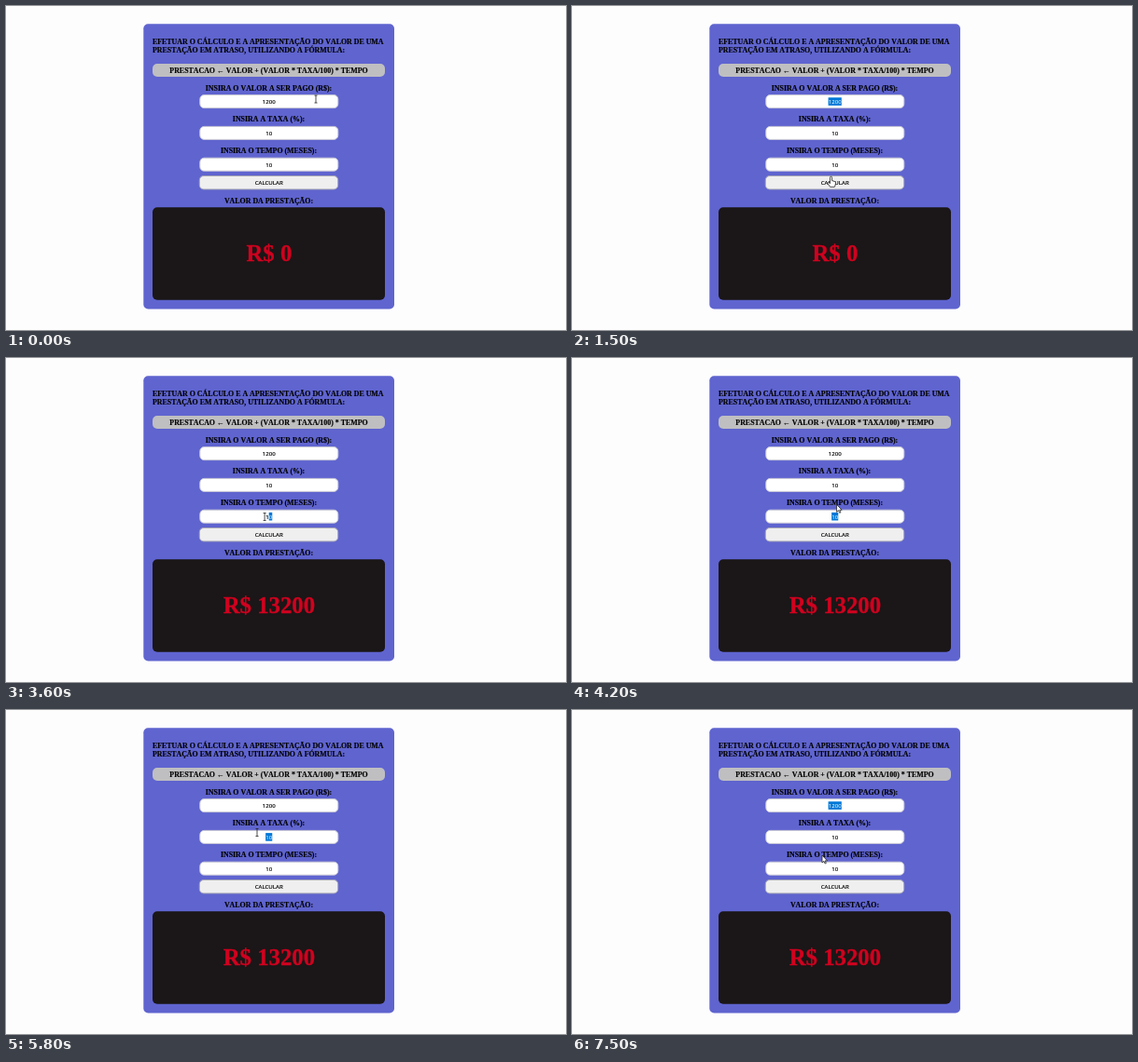
An HTML page that plays this animation: 600 by 348 pixels, repeating every 8000 ms.

```html
<!DOCTYPE html>
<html lang="pt">
<head>
<meta charset="utf-8">
<style>
html, body { margin: 0; height: 100%; overflow: hidden; background: #fdfdfe; }
svg { display: block; }
text { font: bold 7.9px "Liberation Serif", "Times New Roman", serif; font-kerning: none; fill: #000; stroke: #000; stroke-width: .15; }
.mid { text-anchor: middle; }
.ui { font: 6.1px "Noto Sans", "Open Sans", sans-serif; }
#picked { text-anchor: end; fill: #fff; stroke: none; }
#result { font-size: 24.8px; fill: #d0021f; stroke: #d0021f; stroke-width: .3; }
.field { fill: #fff; stroke: #c9c9d6; }
</style>
</head>
<body>
<svg width="600" height="348" viewBox="0 0 600 348">
  <rect x="147.3" y="19.3" width="268.7" height="306.2" rx="5" fill="#5f64cf"/>
  <text x="157" y="41.4">EFETUAR O CÁLCULO E A APRESENTAÇÃO DO VALOR DE UMA</text>
  <text x="157" y="50.4">PRESTAÇÃO EM ATRASO, UTILIZANDO A FÓRMULA:</text>
  <rect x="157" y="62" width="249" height="14" rx="5" fill="#bfbfc1"/>
  <text class="mid" x="281.5" y="71.7">PRESTACAO ← VALOR + (VALOR * TAXA/100) * TEMPO</text>
  <g id="fields"></g>
  <rect x="207.3" y="182.5" width="148.4" height="14.4" rx="4.5" fill="#efeff0" stroke="#a5a5b4"/>
  <text class="mid ui" x="281.7" y="192.2">CALCULAR</text>
  <text class="mid" x="281.5" y="212">VALOR DA PRESTAÇÃO:</text>
  <rect x="157" y="216.3" width="249" height="99.5" rx="5" fill="#1b1617"/>
  <text class="mid" id="result" x="281.9" y="274.4"></text>
  <rect id="mark" height="8.6" fill="#0078d7"/>
  <text class="ui" id="picked"></text>
  <path id="cursor" stroke="#222" stroke-width=".8" stroke-linejoin="round"/>
</svg>
<script>
const MID = 281.7, DIGIT = 3.55, LOOP = 8000, STEP = 100, CLICK = 1800;
const set = (id, attrs) => {
  for (const key in attrs) document.getElementById(id).setAttribute(key, attrs[key]);
};
const write = (id, text) => { document.getElementById(id).textContent = text; };

const fields = [
  ['INSIRA O VALOR A SER PAGO (R$):', '1200'],
  ['INSIRA A TAXA (%):', '10'],
  ['INSIRA O TEMPO (MESES):', '10']
].map(([label, value], i) => ({ label, value, y: 102.7 + 33.8 * i }));

document.getElementById('fields').innerHTML = fields.map(({ y, label, value }) => `
  <text class="mid" x="281.5" y="${y - 12.2}">${label}</text>
  <rect class="field" x="207.8" y="${y - 7.1}" width="148" height="14" rx="4.5"/>
  <text class="mid ui" x="${MID}" y="${y + 2.3}">${value}</text>`).join('');

const shapes = {
  beam: 'M-1.5-4H1.5M0-4V4M-1.5 4H1.5',
  hand: 'M-1 1.2a1 1 0 0 1 2 0V4.5l3 1q1.2.4 1 1.8L4.4 10 3.8 11.3H-1L-3.5 7.5q-.6-1.2.5-1.2l2 1.2Z',
  arrow: 'M0 0V8L1.9 6.3 3.1 9 4.3 8.5 3.1 5.9H5.5Z'
};

// Pointer gestures; a drag names the field whose digits it selects
const home = { x: 332, y: 100 };
const moves = [
  { at: 100, time: 600, x: 268, y: 103, drag: 0 },
  { at: 700, time: 300, x: 277.5, y: 183 },
  { at: 1500, time: 300, x: 278, y: 193.5 },
  { at: 2800, time: 400, x: 304, y: 171 },
  { at: 3200, time: 500, x: 274, y: 170.5, drag: 2 },
  { at: 3800, time: 900, x: 297, y: 139 },
  { at: 4800, time: 500, x: 269, y: 131.5, drag: 1 },
  { at: 5800, time: 400, x: 298, y: 102 },
  { at: 6400, time: 200, x: 268, y: 102, drag: 0 },
  { at: 6600, time: 200, x: 258, y: 158 },
  { at: 7000, time: 500, x: 268, y: 156 }
];

const clamp = (v, lo, hi) => Math.min(hi, Math.max(lo, v));
const ease = k => k * k * (3 - 2 * k);

function pointer(t) {
  return moves.reduce((p, m) => {
    const k = ease(clamp((t - m.at) / m.time, 0, 1));
    return { x: p.x + (m.x - p.x) * k, y: p.y + (m.y - p.y) * k };
  }, home);
}

function shapeAt(y) {
  if (y > 181 && y < 198) return 'hand';
  return fields.some(f => Math.abs(y - f.y) < 7.5) ? 'beam' : 'arrow';
}

// The selection runs from the right end to the digit under the pointer, one step late
function select(t) {
  const drag = moves.filter(m => 'drag' in m && m.at <= t).pop();
  const cleared = !drag || (t >= CLICK && drag.at < CLICK);
  const { y, value } = fields[cleared ? 0 : drag.drag];
  const half = value.length * DIGIT / 2;
  const { x } = pointer(Math.min(t - STEP, drag ? drag.at + drag.time : 0));
  const from = clamp(Math.floor((x - MID + half) / DIGIT), 0, value.length);
  const text = cleared ? '' : value.slice(from);
  const width = text.length * DIGIT;
  set('mark', { x: MID + half - width, y: y - 4.4, width });
  set('picked', { x: MID + half, y: y + 2.3 });
  write('picked', text);
}

function draw(now) {
  const t = Math.floor(now % LOOP / STEP) * STEP;
  const { x, y } = pointer(t), shape = shapeAt(y);
  set('cursor', {
    d: shapes[shape],
    fill: shape === 'beam' ? 'none' : '#fff',
    transform: `translate(${x} ${y})`
  });
  write('result', t > CLICK ? 'R$ 13200' : 'R$ 0');
  select(t);
}

let start;
function tick(now) {
  start ??= now;
  draw(now - start);
  requestAnimationFrame(tick);
}
draw(0);
requestAnimationFrame(tick);
</script>
</body>
</html>
```
